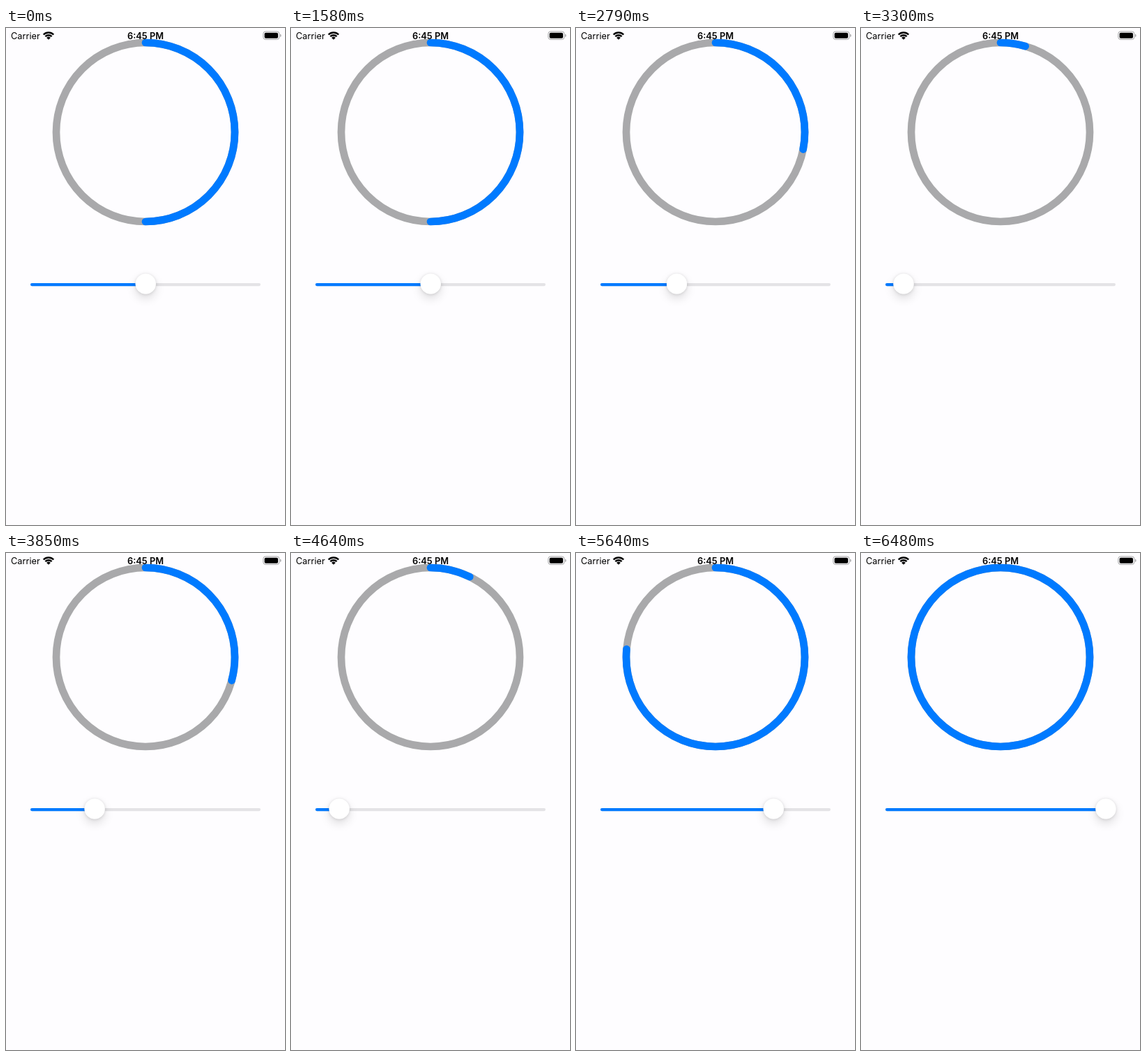
These frames come from a looping animation (400x711 px, 7.67 s). An HTML page with a canvas:

```html
<!DOCTYPE html>
<html lang="en">
<head>
<meta charset="utf-8">
<title>Slider ring</title>
<style>
  html, body { margin: 0; width: 100%; height: 100%; overflow: hidden; background: #fefdff; }
  canvas { display: block; width: 400px; height: 711px; }
</style>
</head>
<body>
<canvas id="stage"></canvas>
<script>
const W = 400, H = 711, LOOP = 7670;
const BLUE = '#007aff', GRAY = '#a9a9ab', TRACK = '#e4e3e6', BG = '#fefdff';
const LAG = 10; // ring trails the thumb slightly, in ms

// Turning points of the drag: [time, value]
const turns = [
  [1580, .5], [1812, .75], [2142, .035], [2400, .75], [2655, .038],
  [2985, .8], [3315, .035], [3646, .8], [3966, .04], [4310, .8],
  [4660, .06], [4990, .88], [5310, .07], [5680, .795], [5960, .02], [6260, 1]
];

const canvas = document.getElementById('stage');
const ctx = canvas.getContext('2d');
const dpr = window.devicePixelRatio || 1;
canvas.width = Math.round(W * dpr);
canvas.height = Math.round(H * dpr);
ctx.scale(dpr, dpr);

function valueAt(t) {
  if (t <= turns[0][0]) return turns[0][1];
  const i = turns.findIndex(p => p[0] > t);
  if (i < 0) return turns[turns.length - 1][1];
  const [t0, a] = turns[i - 1], [t1, b] = turns[i];
  return a + (b - a) * (1 - Math.cos(Math.PI * (t - t0) / (t1 - t0))) / 2;
}

function arc(x, y, r, from, to, width, color, cap = 'butt') {
  ctx.beginPath();
  ctx.arc(x, y, r, from, to);
  ctx.lineWidth = width;
  ctx.strokeStyle = color;
  ctx.lineCap = cap;
  ctx.stroke();
}

function pill(x, y, w, h, r, color) {
  ctx.beginPath();
  ctx.roundRect(x, y, w, h, r);
  ctx.fillStyle = color;
  ctx.fill();
}

function label(text, x, weight, align) {
  ctx.font = weight + ' 12.8px Inter, "Liberation Sans", sans-serif';
  ctx.textAlign = align;
  ctx.fillStyle = '#000';
  ctx.fillText(text, x, 15.5);
}

function drawRing(v) {
  const top = -Math.PI / 2;
  arc(200, 149, 128, 0, Math.PI * 2, 10.7, GRAY);
  arc(200, 149, 128, top, top + Math.PI * 2 * v, 10.7, BLUE, 'round');
}

function drawThumb(x, offset, blur, alpha) {
  ctx.save();
  ctx.shadowColor = `rgba(0,0,0,${alpha})`;
  ctx.shadowOffsetY = offset * dpr;
  ctx.shadowBlur = blur * dpr;
  ctx.beginPath();
  ctx.arc(x, 366, 14.6, 0, Math.PI * 2);
  ctx.fillStyle = '#fff';
  ctx.fill();
  ctx.restore();
}

function drawSlider(v) {
  const x = 49.5 + 301.5 * v;
  pill(35, 364.9, 330, 4.3, 2.1, TRACK);
  pill(35, 364.9, x - 35, 4.3, 2.1, BLUE);
  drawThumb(x, 6.4, 13.5, .13);
  drawThumb(x, .5, 4, .13);
}

function drawStatus() {
  label('Carrier', 7, 400, 'left');
  label('6:45 PM', 200, 600, 'center');

  const a = -Math.PI * .75, b = -Math.PI * .25;
  arc(61, 16.8, 10.3, a, b, 2.4, '#000');
  arc(61, 16.8, 6.5, a, b, 2.4, '#000');
  arc(61, 16.8, 2, a, b, 4, '#000');

  ctx.beginPath();
  ctx.roundRect(368.8, 5, 23, 11.4, 3.3);
  ctx.lineWidth = 1;
  ctx.strokeStyle = '#a3a3a5';
  ctx.stroke();
  pill(370.6, 6.7, 19.4, 8, 1.8, '#000');
  pill(393, 8.8, 1.4, 4, [0, 1.4, 1.4, 0], '#a3a3a5');
}

function frame(now) {
  const t = now % LOOP;
  ctx.fillStyle = BG;
  ctx.fillRect(0, 0, W, H);
  drawRing(valueAt(t - LAG));
  drawSlider(valueAt(t));
  drawStatus();
}

const start = performance.now();
function tick() {
  frame(performance.now() - start);
  requestAnimationFrame(tick);
}
tick();
</script>
</body>
</html>
```
